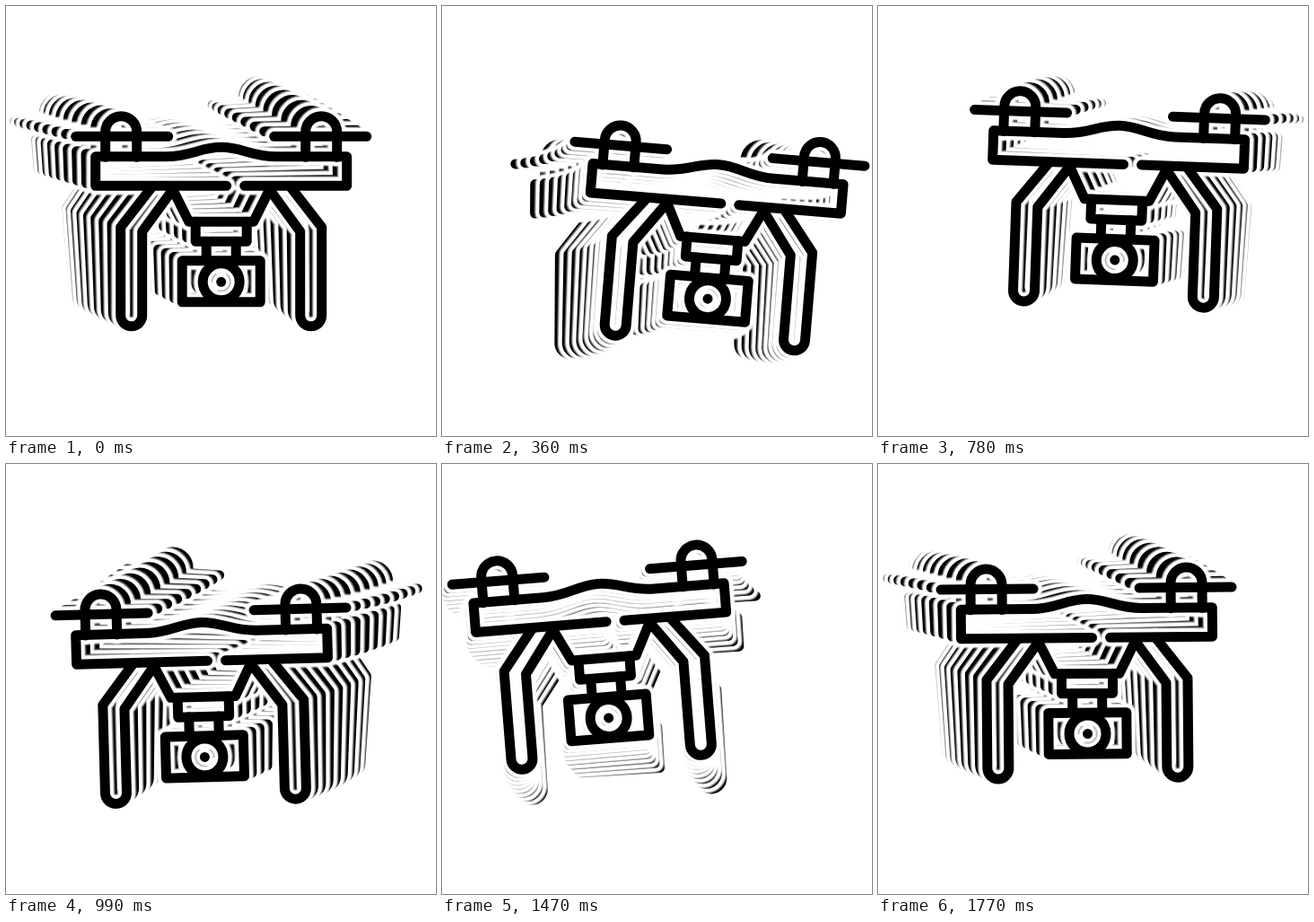
Animation, 479 px wide and 479 px high, one loop 1.8 s. Source, as an HTML page:

```html
<!DOCTYPE html>
<html lang="en">
<head>
<meta charset="utf-8">
<title>Flying drone</title>
<style>
  html, body { margin: 0; width: 100%; height: 100%; overflow: hidden; background: #fff; }
  svg { display: block; width: 100%; height: 100%; }
  #drone { fill: none; stroke-linecap: round; stroke-linejoin: round; }
  .glow, .haze, .halo { stroke: #fff; }
  .glow { stroke-width: 22.5px; stroke-opacity: .3; }
  .haze { stroke-width: 20.5px; stroke-opacity: .55; }
  .halo { stroke-width: 18.5px; }
  .ink { stroke: #000; stroke-width: 11px; }
</style>
</head>
<body>
<svg id="stage" viewBox="0 0 479 479">
  <defs>
    <!-- left half of the mirrored parts; the axis is x = 0 -->
    <g id="side">
      <path d="M-162 -95H-59"/>
      <path d="M-129 -72V-100a17.5 17.5 0 0 1 35 0V-72"/>
      <path d="M-77 -39L-112 6V104.5a12 12 0 0 0 24 0V11L-53 -37"/>
    </g>
    <g id="drone">
      <use href="#side"/>
      <use href="#side" transform="scale(-1 1)"/>
      <path d="M6 -40H-140V-72.5H-62C-34 -72.5 -23 -83 0 -83S34 -72.5 62 -72.5H140V-40H26"/>
      <path d="M-54 -36L-36 0H36L54 -36"/>
      <path d="M-28.5 0V22H28.5V0"/>
      <path d="M-16.5 22V43M16.5 22V43"/>
      <rect x="-43.5" y="43.5" width="87" height="46"/>
      <circle cy="67" r="20.5"/>
      <path d="M0 67h.01"/>
    </g>
  </defs>
</svg>
<script>
  const LOOP = 1800, STEP = 30;
  const GHOSTS = 8, LAG = 0.15;
  const CENTER_X = 239.7, CENTER_Y = 240.3;
  const SWAY = 65, BOB = 32.5, TILT = 5;
  const LOOKS = ["glow", "haze", "halo", "ink"];
  const NS = "http://www.w3.org/2000/svg";
  const stage = document.getElementById("stage");

  function add(parent, tag, attrs = {}) {
    const node = document.createElementNS(NS, tag);
    for (const key in attrs) node.setAttribute(key, attrs[key]);
    return parent.appendChild(node);
  }

  // Oldest ghost first, so the leading drone is painted on top.
  const layers = [];
  for (let i = GHOSTS; i >= 0; i--) {
    const node = add(stage, "g");
    for (const look of LOOKS) add(node, "use", { href: "#drone", class: look });
    layers.push({ node, lag: i * LAG });
  }

  function draw(ms) {
    const time = Math.floor((ms % LOOP) / STEP) * STEP;
    const phase = time / LOOP * 2 * Math.PI;
    for (const { node, lag } of layers) {
      const swing = Math.sin(phase - lag);
      const x = CENTER_X + SWAY * swing;
      const y = CENTER_Y + BOB * Math.sin(2 * phase - lag);
      node.setAttribute("transform", `translate(${x} ${y}) rotate(${TILT * swing})`);
    }
  }

  const start = performance.now();
  function tick() {
    draw(performance.now() - start);
    requestAnimationFrame(tick);
  }
  tick();
</script>
</body>
</html>
```
